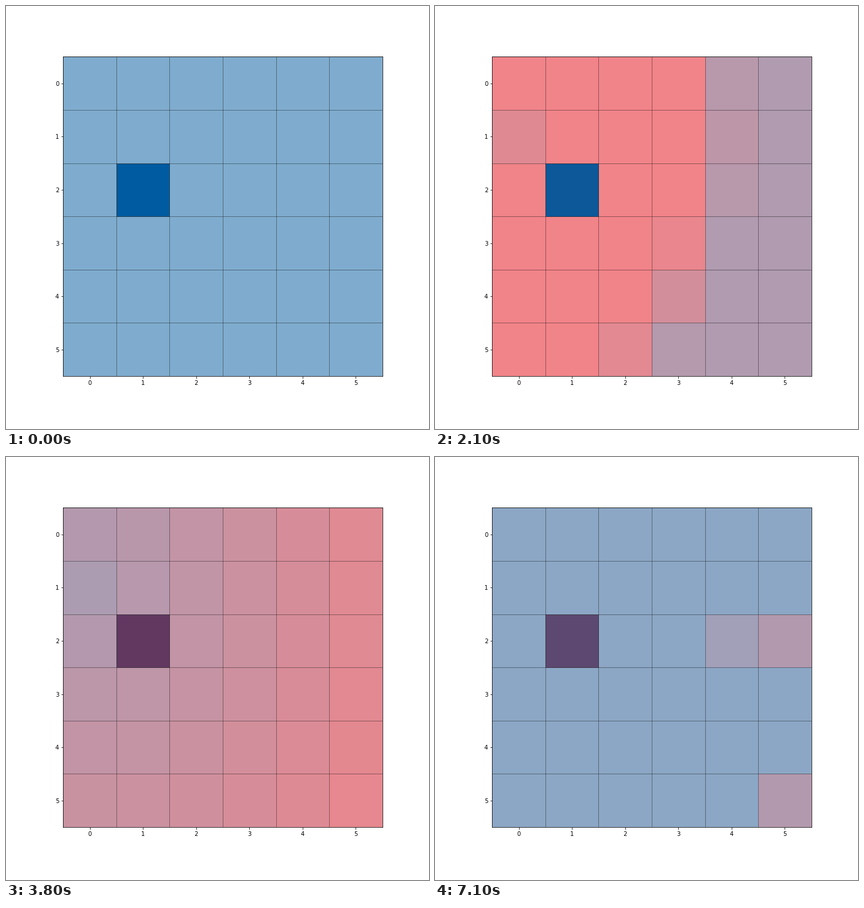
Animation, 720 px wide and 720 px high, one loop 7400 ms. Source, as a matplotlib script:

```python
import math

import numpy as np
import matplotlib.pyplot as plt
from matplotlib.animation import FuncAnimation
from matplotlib.colors import to_rgb
from matplotlib.patches import Rectangle

SIZE = 6
FRAMES, STEP = 74, 100
SEED_CELL, FOCUS = (1, 0), (2, 1)
BLUE = np.array([0, 90, 158]) / 255
RED = np.array([228, 10, 20]) / 255

# Times in ms.
FIRST_ONSET, LAST_ONSET, RISE = 600, 1800, 700
FALL_TIMES = [FIRST_ONSET + RISE, 2500, 3800, 4800, 7100]
RESIDUE = 0.12
LINGER = {(2, 4): 0.31, (2, 5): 0.46, (5, 5): 0.46}

FOCUS_KEYS = {1700: "#005ba0", 2500: "#175491", 3800: "#623861",
              4800: "#9d243e", 7100: "#5d4871"}


def distance(row, col):
    """Distance from the seed cell; the wave runs faster along columns."""
    return math.hypot(col - SEED_CELL[1], 0.7 * (row - SEED_CELL[0]))


def cell_level(row, col, t):
    """Red share of a cell: a wave heats it, then it cools exponentially."""
    d = distance(row, col)
    onset = min(FIRST_ONSET + 140 * d ** 1.5, LAST_ONSET)
    rise = np.clip((t - onset) / RISE, 0, 1)
    drift = 0.03 * t / 1000
    cooling = [1, min(1, 0.78 + 0.3 * d), 0.40 + 0.09 * d, 0.25 + 0.055 * d,
               LINGER.get((row, col), RESIDUE)]
    fall = np.exp(np.interp(t, FALL_TIMES, np.log(cooling)))
    return min(max(drift, rise), fall)


def focus_color(t):
    channels = zip(*map(to_rgb, FOCUS_KEYS.values()))
    return [np.interp(t, list(FOCUS_KEYS), channel) for channel in channels]


plt.rcParams["font.family"] = "DejaVu Sans"
fig = plt.figure(figsize=(10, 10), dpi=72, facecolor="white")
ax = fig.add_axes([0.135, 0.125, 0.755, 0.755])
ax.set(xlim=(-0.5, SIZE - 0.5), ylim=(SIZE - 0.5, -0.5),
       xticks=range(SIZE), yticks=range(SIZE))
ax.tick_params(labelsize=10)


def add_cell(row, col, **style):
    rect = Rectangle((col - 0.5, row - 0.5), 1, 1,
                     edgecolor="black", linewidth=0.5, **style)
    return ax.add_patch(rect)


cells = {
    (row, col): add_cell(row, col, alpha=0.5)
    for row in range(SIZE) for col in range(SIZE) if (row, col) != FOCUS
}
focus = add_cell(*FOCUS, zorder=2)


def draw(frame):
    t = frame * STEP
    for (row, col), rect in cells.items():
        rect.set_facecolor(BLUE + (RED - BLUE) * cell_level(row, col, t))
    focus.set_facecolor(focus_color(t))
    return [*cells.values(), focus]


anim = FuncAnimation(fig, draw, frames=FRAMES, interval=STEP,
                     repeat=True, repeat_delay=0)
plt.show()
```
